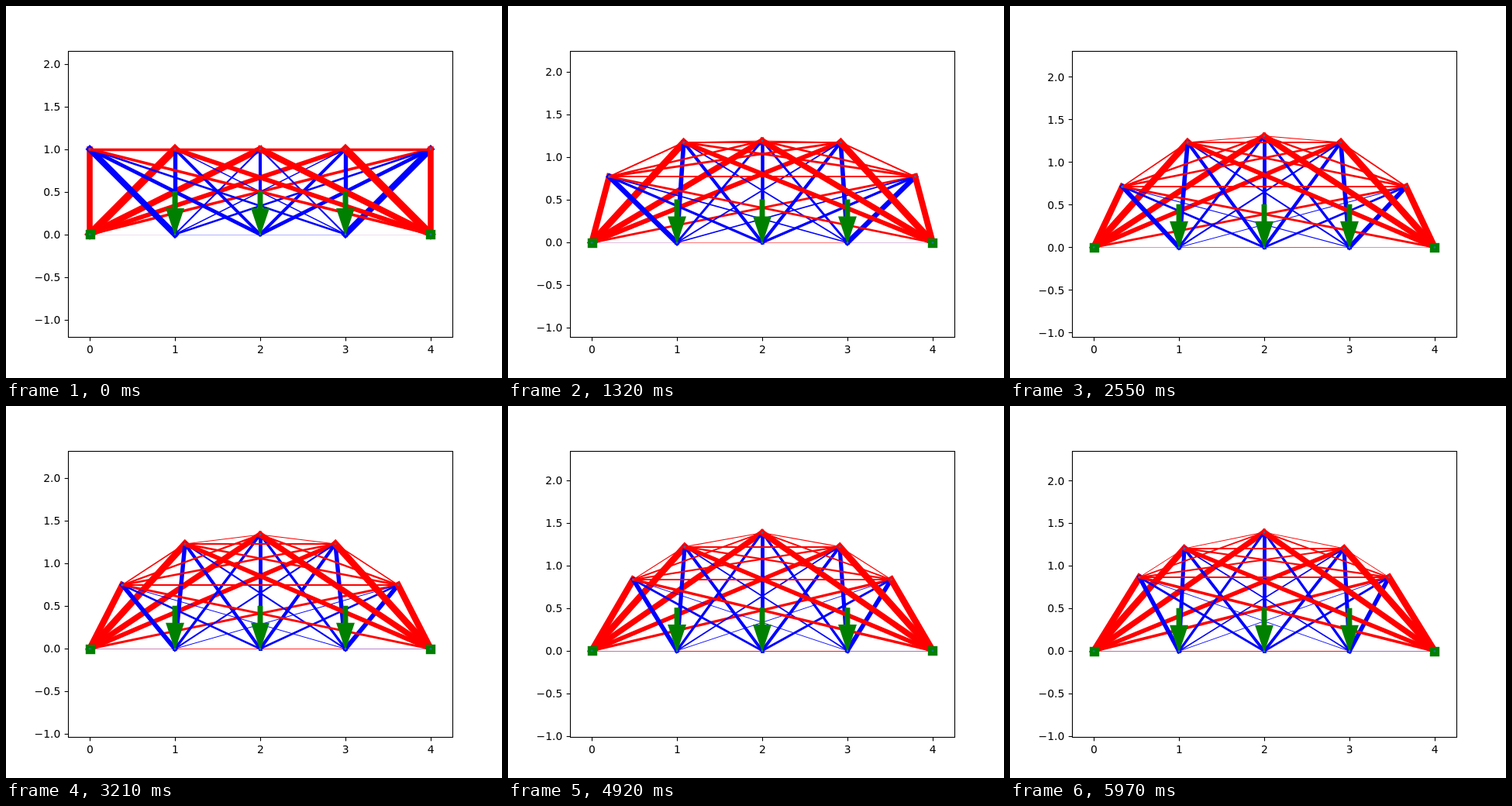
Write an HTML page with a canvas that moves like this. It is 640 by 480 pixels and loops after 6000 ms.

```html
<!DOCTYPE html>
<html lang="en">
<head>
<meta charset="utf-8">
<title>Truss shape optimisation</title>
<style>
html, body { margin: 0; width: 100%; height: 100%; overflow: hidden; background: #fff; }
canvas { display: block; width: 640px; height: 480px; }
</style>
</head>
<body>
<canvas id="stage" width="640" height="480"></canvas>
<script>
const ctx = document.getElementById('stage').getContext('2d');

const STEP = 30, STEPS = 200;
const UNIT = 450.909 / 4.1;           // pixels per data unit
const MID_X = 328, MID_Y = 242.4;
const LOAD = 13.89;                   // load, in pixels of bar width
const AXES = { left: 80.5, top: 58.5, right: 576.5, bottom: 427.5 };

// time, outer node x and y, inner node x and y, crown y
const KEYS = [
  [0,    0,     1,     1,     1,     1],
  [720,  0.118, 0.870, 1.064, 1.112, 1.115],
  [1950, 0.282, 0.709, 1.082, 1.218, 1.260],
  [3210, 0.382, 0.749, 1.118, 1.231, 1.340],
  [4080, 0.436, 0.797, 1.109, 1.226, 1.365],
  [4920, 0.486, 0.835, 1.091, 1.221, 1.385],
  [5970, 0.536, 0.867, 1.063, 1.204, 1.395]
];

const chord = (i, c) => (KEYS[i + 1][c] - KEYS[i][c]) / (KEYS[i + 1][0] - KEYS[i][0]);
const gap = i => KEYS[i + 1][0] - KEYS[i][0];

function slope(i, c) {
  const last = KEYS.length - 1;
  if (i === 0) return 2 * chord(0, c) - slope(1, c);
  if (i === last) return 2 * chord(last - 1, c) - slope(last - 1, c);
  const a = gap(i - 1), b = gap(i);
  return (chord(i - 1, c) * b + chord(i, c) * a) / (a + b);
}

// cubic Hermite curve through the keys
function curve(t, c) {
  let i = 0;
  while (i < KEYS.length - 2 && t > KEYS[i + 1][0]) i++;
  const h = gap(i), s = (t - KEYS[i][0]) / h, r = 1 - s;
  return KEYS[i][c] * (1 + 2 * s) * r * r + slope(i, c) * h * s * r * r
    + KEYS[i + 1][c] * s * s * (3 - 2 * s) - slope(i + 1, c) * h * s * s * r;
}

function nodesAt(t) {
  const [ox, oy, ix, iy, top] = [1, 2, 3, 4, 5].map(c => curve(t, c));
  return [
    [0, 0], [1, 0], [2, 0], [3, 0], [4, 0],
    [ox, oy], [ix, iy], [2, top], [4 - ix, iy], [4 - ox, oy]
  ];
}

function solve(K, f) {
  const n = f.length;
  for (let p = 0; p < n; p++) {
    for (let r = p + 1; r < n; r++) {
      const m = K[r][p] / K[p][p];
      if (!m) continue;
      for (let c = p; c < n; c++) K[r][c] -= m * K[p][c];
      f[r] -= m * f[p];
    }
  }
  for (let r = n - 1; r >= 0; r--) {
    for (let c = r + 1; c < n; c++) f[r] -= K[r][c] * f[c];
    f[r] /= K[r][r];
  }
  return f;
}

// every pair of nodes is joined by a bar of equal stiffness
function barsOf(nodes) {
  const size = nodes.length * 2;
  const K = Array.from({ length: size }, () => new Array(size).fill(0));
  const f = new Array(size).fill(0);
  const bars = [];
  for (let a = 0; a < nodes.length; a++) {
    for (let b = a + 1; b < nodes.length; b++) {
      const dx = nodes[b][0] - nodes[a][0], dy = nodes[b][1] - nodes[a][1];
      const len = Math.hypot(dx, dy), x = dx / len, y = dy / len;
      const dof = [2 * a, 2 * a + 1, 2 * b, 2 * b + 1], dir = [-x, -y, x, y];
      dof.forEach((r, i) => dof.forEach((c, j) => { K[r][c] += dir[i] * dir[j]; }));
      bars.push({ a, b, dof, dir });
    }
  }
  for (const n of [1, 2, 3]) f[2 * n + 1] = -LOAD;
  for (const n of [0, 4]) {
    for (const d of [2 * n, 2 * n + 1]) {
      K[d].fill(0);
      K.forEach(row => { row[d] = 0; });
      K[d][d] = 1;
    }
  }
  const u = solve(K, f);
  for (const bar of bars) bar.force = bar.dof.reduce((sum, d, i) => sum + bar.dir[i] * u[d], 0);
  return bars;
}

function line(x1, y1, x2, y2) {
  ctx.beginPath();
  ctx.moveTo(x1, y1);
  ctx.lineTo(x2, y2);
  ctx.stroke();
}

const snap = (v, w) => Math.floor(v + 0.5) + (Math.round(w) % 2 ? 0.5 : 0);

function drawBar(p, q, force) {
  const w = Math.abs(force);
  if (w < 0.005) return;
  let ends = [...p, ...q];
  if (Math.abs(p[0] - q[0]) < 1e-6 || Math.abs(p[1] - q[1]) < 1e-6) {
    ends = ends.map(v => snap(v, Math.max(w, 1)));
  }
  ctx.strokeStyle = force < 0 ? '#f00' : '#00f';
  ctx.lineWidth = w;
  line(...ends);
}

function drawArrow(x, y) {
  const shaft = 0.025 * UNIT, head = 0.1 * UNIT;
  const start = y - 0.5 * UNIT, neck = y - 0.3 * UNIT;
  ctx.beginPath();
  ctx.moveTo(x, y);
  ctx.lineTo(x - head, neck);
  ctx.lineTo(x - shaft, neck);
  ctx.lineTo(x - shaft, start);
  ctx.lineTo(x + shaft, start);
  ctx.lineTo(x + shaft, neck);
  ctx.lineTo(x + head, neck);
  ctx.closePath();
  ctx.fill();
  ctx.stroke();
}

function drawAxes(toX, toY) {
  const { left, top, right, bottom } = AXES;
  ctx.strokeStyle = ctx.fillStyle = '#000';
  ctx.lineWidth = 1.11;
  ctx.lineCap = 'butt';
  ctx.strokeRect(left, top, right - left, bottom - top);
  ctx.font = '13.89px "DejaVu Sans", sans-serif';
  ctx.textBaseline = 'alphabetic';
  ctx.textAlign = 'center';
  for (let v = 0; v <= 4; v++) {
    const x = snap(toX(v), 1);
    line(x, bottom, x, bottom + 4.86);
    ctx.fillText(v, toX(v) + 0.3, 448);
  }
  ctx.textAlign = 'right';
  for (let v = -1; v <= 2; v += 0.5) {
    const y = snap(toY(v), 1);
    line(left, y, left - 4.86, y);
    ctx.fillText(v.toFixed(1).replace('-', '\u2212'), 70.3, Math.round(toY(v) + 5.1));
  }
}

function draw(t) {
  const nodes = nodesAt(t);
  const crown = Math.max(...nodes.map(n => n[1]));
  const base = MID_Y + (crown / 2 - 0.025) * UNIT;
  const toX = x => MID_X + (x - 2) * UNIT;
  const toY = y => base - y * UNIT;
  const points = nodes.map(([x, y]) => [toX(x), toY(y)]);

  ctx.fillStyle = '#fff';
  ctx.fillRect(0, 0, 640, 480);

  ctx.lineCap = 'square';
  for (const { a, b, force } of barsOf(nodes)) drawBar(points[a], points[b], force);

  ctx.fillStyle = ctx.strokeStyle = '#008000';
  ctx.lineWidth = 1.39;
  ctx.lineJoin = 'miter';
  const side = 0.1 * UNIT;
  for (const n of [0, 4]) {
    const x = snap(points[n][0] - side / 2, 1), y = snap(points[n][1] - side / 2, 1);
    ctx.fillRect(x, y, side, side);
    ctx.strokeRect(x, y, side, side);
  }
  for (const n of [1, 2, 3]) drawArrow(...points[n]);

  ctx.fillStyle = 'rgba(31, 119, 180, 0.8)';
  for (const [x, y] of points) {
    ctx.beginPath();
    ctx.arc(x, y, 1.4, 0, 2 * Math.PI);
    ctx.fill();
  }

  drawAxes(toX, toY);
}

const begin = performance.now();
let shown = -1;

function tick() {
  const step = Math.floor((performance.now() - begin) / STEP) % STEPS;
  if (step !== shown) draw((shown = step) * STEP);
  requestAnimationFrame(tick);
}
tick();
</script>
</body>
</html>
```
